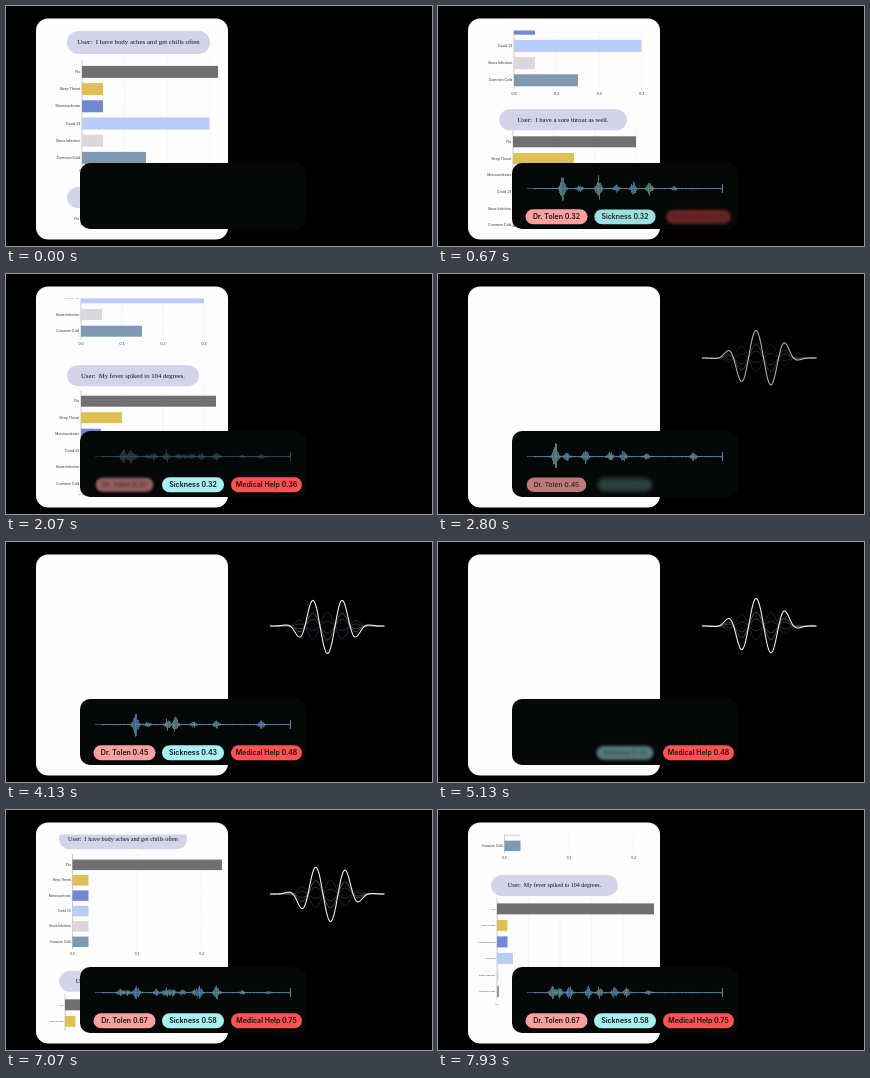
Write an HTML page with a canvas that moves like this. It is 426 px wide and 240 px high and loops after 8 s.

```html
<!DOCTYPE html>
<html lang="en">
<head>
<meta charset="utf-8">
<style>
html, body { margin: 0; width: 100%; height: 100%; overflow: hidden; background: #000; }
canvas { display: block; width: 426px; height: 240px; }
</style>
</head>
<body>
<canvas></canvas>
<script>
const LOOP = 8000, W = 426, H = 240;
const canvas = document.querySelector('canvas');
const ctx = canvas.getContext('2d');
const dpr = window.devicePixelRatio || 1;
canvas.width = W * dpr;
canvas.height = H * dpr;

const clamp = v => Math.max(0, Math.min(1, v));
const ramp = (t, start, length) => clamp((t - start) / length);
const hash = n => { const s = Math.sin(n * 127.1) * 43758.5453; return s - Math.floor(s); };

function box(x, y, w, h, r, color) {
  ctx.fillStyle = color;
  ctx.beginPath();
  ctx.roundRect(x, y, w, h, r);
  ctx.fill();
}

function label(text, x, y, font, align = 'center', color = '#111') {
  ctx.font = font;
  ctx.textAlign = align;
  ctx.textBaseline = 'middle';
  ctx.fillStyle = color;
  ctx.fillText(text, x, y);
}

// Scrolling conversation: a message pill followed by a bar chart
const ILLNESSES = ['Flu', 'Strep Throat', 'Mononucleosis', 'Covid 19', 'Sinus Infection', 'Common Cold'];
const BAR_COLORS = ['#707070', '#dec055', '#7288d2', '#b9ccf8', '#dcd6de', '#7f99b3'];
const ACHES = 'I have body aches and get chills often';
const THROAT = 'I have a sore throat as well.';
const FEVER = 'My fever spiked to 104 degrees.';

const PASSES = [
  { from: -1, to: 2100, origin: 0, speed: 154 / 1330, items: [
    { y: 36.5, text: ACHES, size: 6.9, pill: [61, 143, 23], axis: 76, first: 29.5, pitch: 17.2, bar: 12,
      tick: 42.6, step: .1, font: 3.7, bars: [136, 21, 21, 127.5, 21, 64] },
    { y: 191.5, text: THROAT, size: 6.7, pill: [61, 128, 21], axis: 75, first: 22, pitch: 16.7, bar: 11,
      tick: 41, step: .1, font: 3.6, bars: [123, 61, 21, 123, 21, 61] },
    { y: 341.5, text: FEVER, size: 6.7, pill: [61, 132, 21], axis: 75, first: 25.5, pitch: 16.5, bar: 11,
      tick: 41, step: .1, font: 3.6, bars: [135, 41, 20, 62, 20, 20] } ] },
  { from: 5400, to: LOOP, origin: 6200, speed: 193 / 1730, items: [
    { y: -11, text: THROAT, size: 6.2, pill: [53, 128, 21], axis: 65, first: 26, pitch: 14.8, bar: 9.5,
      tick: 36.7, step: .1, font: 3.4, bars: [37, 37, 37, 146.5, 18.5, 18.5] },
    { y: 126, text: ACHES, size: 6.2, pill: [53, 128, 21], axis: 66.5, first: 26, pitch: 15.4, bar: 10.5,
      tick: 64.5, step: .2, font: 3.3, bars: [149.5, 16, 16, 16, 16, 16] },
    { y: 268.5, text: FEVER, size: 6, pill: [53, 127, 21], axis: 59, first: 23.5, pitch: 16.5, bar: 11,
      tick: 31.5, step: .2, font: 2.5, bars: [157, 10.5, 10.5, 16, 1.5, 2] } ] }
];

function drawItem(item, y) {
  const [px, pw, ph] = item.pill;
  box(px, y - ph / 2, pw, ph, ph / 2, '#d3d3ea');
  label('User:  ' + item.text, px + pw / 2, y + .3, `${item.size}px "Liberation Serif", serif`);

  const font = `${item.font}px "Liberation Sans", sans-serif`;
  const top = y + item.first - item.bar;
  const bottom = y + item.first + item.pitch * 5 + item.bar * .7;
  for (let i = 0, x = item.axis; x < 216; i++, x += item.tick) {
    ctx.strokeStyle = i ? '#e4e2ec' : '#aaa';
    ctx.lineWidth = .6;
    ctx.setLineDash(i ? [2, 1.5] : []);
    ctx.beginPath();
    ctx.moveTo(x, top);
    ctx.lineTo(x, bottom);
    ctx.stroke();
    label((i * item.step).toFixed(1), x, bottom + 5, font, 'center', '#333');
  }
  ctx.setLineDash([]);
  item.bars.forEach((width, i) => {
    const cy = y + item.first + i * item.pitch;
    ctx.fillStyle = BAR_COLORS[i];
    ctx.fillRect(item.axis, cy - item.bar / 2, width, item.bar);
    label(ILLNESSES[i], item.axis - 1.8, cy, font, 'right', '#333');
  });
}

function drawCard(t) {
  box(30, 12.5, 192, 221, 12, '#fdfdfe');
  ctx.save();
  ctx.beginPath();
  ctx.rect(30, 24.5, 192, 196.5);
  ctx.clip();
  for (const pass of PASSES) {
    const alpha = (pass.from < 0 ? 1 : ramp(t, pass.from, 300)) *
                  (pass.to === LOOP ? 1 : 1 - ramp(t, pass.to, 300));
    if (!alpha) continue;
    ctx.globalAlpha = alpha;
    for (const item of pass.items) {
      const y = item.y - (t - pass.origin) * pass.speed;
      if (y > -130 && y < 240) drawItem(item, y);
    }
  }
  ctx.restore();
}

// Audio panel
const CYCLES = [
  { start: 100, end: 1900, scores: ['0.32', '0.32', '0.36'] },
  { start: 2500, end: 4730, scores: ['0.45', '0.43', '0.48'] },
  { start: 5620, end: 9e9, scores: ['0.67', '0.58', '0.75'] }
];
const CHIPS = [
  { name: 'Dr. Tolen', x: 87.5, w: 62, color: '#fba0a0' },
  { name: 'Sickness', x: 156, w: 62, color: '#a8f0f2' },
  { name: 'Medical Help', x: 225, w: 71, color: '#fd5352' }
];
// Bursts of speech as [position, height]
const SPEECH = [
  { time: 1330, bursts: [[124, 17], [141, 4], [160, 13], [178, 4], [195, 7], [211, 7], [236, 2]] },
  { time: 2800, bursts: [[117, 16], [128, 5], [147, 7], [172, 5], [185, 6], [208, 3], [255, 4]] },
  { time: 4130, bursts: [[129, 14], [141, 3], [161, 6], [169, 8], [187, 3], [210, 4], [255, 4]] },
  { time: 6200, bursts: [[129, 9], [158, 6], [166, 7], [193, 13], [210, 13], [236, 4], [262, 2]] },
  { time: 7930, bursts: [[114, 8], [121, 7], [131, 7], [150, 6], [161, 6], [176, 6], [188, 5], [210, 2]] }
];

const loudness = (bursts, x) =>
  bursts.reduce((sum, [center, height]) => sum + height * Math.exp(-(((x - center) / 2.8) ** 2)), .7);

function drawSpeech(t, alpha) {
  const next = SPEECH.findIndex(key => key.time >= t);
  const b = SPEECH[next < 0 ? SPEECH.length - 1 : next];
  const a = SPEECH[Math.max(0, next < 0 ? SPEECH.length - 1 : next - 1)];
  const mix = a === b ? 0 : (t - a.time) / (b.time - a.time);
  ctx.globalAlpha = alpha;
  ctx.fillStyle = '#466579';
  ctx.fillRect(89, 182.2, 196, .8);
  for (let x = 96; x < 284; x++) {
    const level = loudness(a.bursts, x) * (1 - mix) + loudness(b.bursts, x) * mix;
    const up = level * (.45 + .55 * hash(x)), down = level * (.45 + .55 * hash(x + 400));
    ctx.fillStyle = ['#4f7fc4', '#6d9a86', '#527fa0'][Math.floor(hash(x + 90) * 3)];
    ctx.fillRect(x, 182.6 - up, .8, up + down);
  }
  ctx.fillStyle = '#5c86a8';
  ctx.fillRect(284, 178, 1, 9);
  ctx.globalAlpha = 1;
}

function drawChip(chip, score, shown) {
  if (!shown) return;
  const cx = chip.x + chip.w / 2, cy = 210.8, scale = .84 + .16 * shown;
  ctx.save();
  ctx.globalAlpha = shown;
  if (shown < 1) ctx.filter = `blur(${(1 - shown) * 3 * dpr}px)`;
  ctx.translate(cx, cy);
  ctx.scale(scale, scale);
  box(-chip.w / 2, -7.5, chip.w, 15, 7.5, chip.color);
  label(`${chip.name} ${score}`, 0, .3, '600 7px Inter, sans-serif');
  ctx.restore();
}

function drawPanel(t) {
  box(74, 157, 226, 66, 10, '#050806');
  for (const { start, end, scores } of CYCLES) {
    if (t < start - 100 || t > end + 800) continue;
    drawSpeech(t, ramp(t, start - 100, 300) * (1 - ramp(t, end, 300)));
    CHIPS.forEach((chip, i) => {
      const delay = i * 200;
      drawChip(chip, scores[i], ramp(t, start + delay, 400) * (1 - ramp(t, end + delay, 400)));
    });
  }
}

// Voice wave: travelling cosine with a bell-shaped envelope
const PHASES = [[2800, -.73], [4130, Math.PI], [5130, 5.58], [6200, 8.05]];
const STRANDS = [[-.5, '#44506e', .5], [-.17, '#60607a', .5], [.25, '#7d6a58', .6], [.5, '#77777f', .7], [1, '#f0f0f0', 1.1]];

function phaseAt(t) {
  let i = 0;
  while (i < PHASES.length - 2 && t > PHASES[i + 1][0]) i++;
  const [t0, p0] = PHASES[i], [t1, p1] = PHASES[i + 1];
  return p0 + (p1 - p0) * (t - t0) / (t1 - t0);
}

function drawWave(t) {
  const alpha = ramp(t, 2600, 280) * (1 - ramp(t, 7500, 300));
  if (!alpha) return;
  const phase = phaseAt(t);
  ctx.globalAlpha = alpha;
  for (const [gain, color, width] of STRANDS) {
    ctx.strokeStyle = color;
    ctx.lineWidth = width;
    ctx.beginPath();
    for (let u = -2; u <= 2; u += .02) {
      const envelope = (4 / (4 + u ** 4)) ** 4;
      ctx.lineTo(321.5 + u * 28.75, 84 - 27.5 * gain * envelope * Math.cos(6 * u - phase));
    }
    ctx.stroke();
  }
  ctx.globalAlpha = 1;
}

const began = performance.now();
function frame() {
  const t = (performance.now() - began) % LOOP;
  ctx.setTransform(dpr, 0, 0, dpr, 0, 0);
  ctx.fillStyle = '#000';
  ctx.fillRect(0, 0, W, H);
  drawCard(t);
  drawPanel(t);
  drawWave(t);
  requestAnimationFrame(frame);
}
frame();
</script>
</body>
</html>
```
